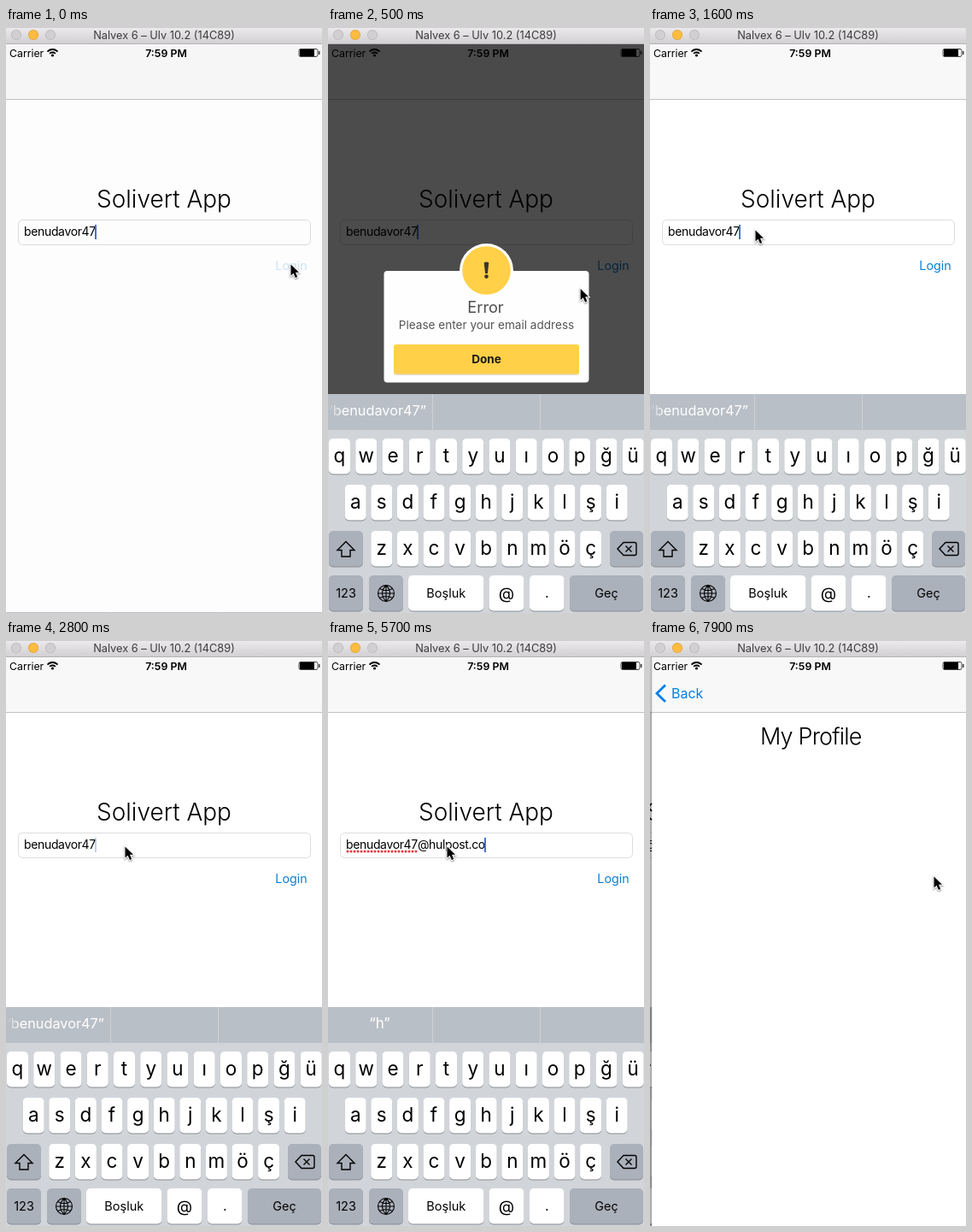
An HTML page with a canvas that plays this animation: 370 px wide and 684 px high, repeating every 8000 ms.

```html
<!DOCTYPE html>
<html lang="en">
<head>
<meta charset="utf-8">
<title>Login demo</title>
<style>
html, body { margin: 0; width: 100%; height: 100%; overflow: hidden; background: #fff; }
canvas { display: block; }
</style>
</head>
<body>
<canvas id="stage" width="370" height="684"></canvas>
<script>
const W = 370, H = 684, LOOP = 8000, STEP = 100;
const stage = document.getElementById('stage').getContext('2d');
const sheet = new OffscreenCanvas(W, H).getContext('2d');
let c = stage;
const USER = 'benudavor47', DOMAIN = 'hulpost.com';
const BLUE = '#0b7fcf', YELLOW = '#ffd048', BAR = '#b9bfc6';

// Interpolates rows of [time, value, value...], eased between rows.
function track(rows, t, i = 1) {
  let k = 0;
  while (k < rows.length - 1 && rows[k + 1][0] <= t) k++;
  const a = rows[k], b = rows[k + 1];
  if (!b || t <= a[0]) return a[i];
  const u = (t - a[0]) / (b[0] - a[0]);
  return a[i] + (b[i] - a[i]) * u * u * (3 - 2 * u);
}

const pointer = [
  [0, 333, 276], [300, 333, 276], [900, 187, 386], [1100, 180, 382], [1200, 158, 346],
  [1600, 123, 236], [2000, 123, 236], [2400, 139, 240], [6200, 139, 240], [6900, 332, 275]
];
const alertShift = [[0, -400], [200, -54], [300, 12], [500, 0]];
const alertAlpha = [[0, 0.01], [100, 0.43], [200, 0.85], [300, 1], [1200, 1], [1300, 0.6], [1500, 0]];
const keyTimes = [4400, 4500, 4600, 4800, 5000, 5100, 5300, 5500, 5600, 5700, 5900];

function text(s, x, y, size, color = '#000', align = 'center', weight = 400, spacing = 0) {
  c.font = `${weight} ${size}px Inter, Roboto, sans-serif`;
  c.letterSpacing = spacing + 'px';
  c.textAlign = align;
  c.fillStyle = color;
  c.fillText(s, x, y);
  return c.measureText(s).width;
}

function rect(x, y, w, h, color) {
  c.fillStyle = color;
  c.fillRect(x, y, w, h);
}

function box(x, y, w, h, r, color) {
  c.fillStyle = color;
  c.beginPath();
  c.roundRect(x, y, w, h, r);
  c.fill();
}

function disc(x, y, r, color) {
  c.fillStyle = color;
  c.beginPath();
  c.arc(x, y, r, 0, 7);
  c.fill();
}

function stroke(d, color, width) {
  c.strokeStyle = color;
  c.lineWidth = width;
  c.stroke(new Path2D(d));
}

function layer(alpha, draw) {
  c.save();
  c.globalAlpha *= alpha;
  draw();
  c.restore();
}

// Like layer, but fades everything drawn as one flat picture.
function group(alpha, draw) {
  c = sheet;
  c.clearRect(0, 0, W, H);
  c.save();
  draw();
  c.restore();
  c = stage;
  layer(alpha, () => c.drawImage(sheet.canvas, 0, 0));
}

function titleBar() {
  const g = c.createLinearGradient(0, 0, 0, 18);
  g.addColorStop(0, '#ebe9eb');
  g.addColorStop(1, '#d2d0d2');
  rect(0, 0, W, 18, g);
  rect(0, 18, W, 1, '#b4b2b4');
  ['#b9b7b9', '#dfa13a', '#b9b7b9'].forEach((edge, i) => {
    disc(12 + i * 20, 8, 6, edge);
    disc(12 + i * 20, 8, 5.2, i === 1 ? '#fdbc40' : '#d1cfd1');
  });
  text('Nalvex 6 – Ulv 10.2 (14C89)', 185, 13, 12.8, '#3c3c3c');
}

function navBar(back) {
  rect(0, 19, W, 64, '#f8f8f8');
  rect(0, 83, W, 1, '#c2c2c2');
  text('Carrier', 4, 34, 12.3, '#000', 'left');
  for (const r of [4.5, 8]) {
    c.beginPath();
    c.arc(54.5, 33, r, -Math.PI * 0.77, -Math.PI * 0.23);
    c.strokeStyle = '#000';
    c.lineWidth = 1.8;
    c.stroke();
  }
  disc(54.5, 32, 1.6, '#000');
  text('7:59 PM', 187.5, 34, 12.4, '#000', 'center', 600);
  stroke('M345 24.5h18a2 2 0 0 1 2 2v5a2 2 0 0 1-2 2h-18a2 2 0 0 1-2-2v-5a2 2 0 0 1 2-2z', '#444', 1);
  rect(344, 25, 17, 8, '#000');
  rect(366, 27, 1.5, 4, '#444');
  if (back) layer(back, () => {
    stroke('M18 51.5L8 61.3L18 71', '#007fe8', 2.8);
    text('Back', 25, 67, 16, '#007fe8', 'left');
  });
}

// Caret opacity, fading out and in once a second.
function blink(t) {
  const p = t % 1000;
  if (p < 300) return 1 - p / 300;
  if (p < 500) return 0;
  return Math.min(1, (p - 500) / 300);
}

function loginPage(t) {
  rect(0, 84, W, H - 84, '#fff');
  text('Solivert App', 185, 210, 28, '#000', 'center', 300);
  c.beginPath();
  c.roundRect(14.5, 224.5, 342, 29, 5);
  c.strokeStyle = '#dcdcdc';
  c.lineWidth = 1;
  c.stroke();

  const typed = keyTimes.filter(k => k <= t).length;
  const value = USER + (t >= 3200 ? '@' : '') + DOMAIN.slice(0, typed);
  const end = 21 + text(value, 21, 243, 14, '#000', 'left', 400, -0.35);
  if (t >= 3400) for (let x = 23; x < 104; x += 4) disc(x, 246, 1.5, '#e8383c');
  const on = t >= 6200 ? blink(t - 6200) : t >= 1600 && t < 3200 ? blink(t - 1600) : 1;
  layer(on, () => rect(Math.round(end) - 1, 230, 2, 17, '#4673cf'));

  const pressed = t < 100 || (t >= 7100 && t < 7400);
  layer(pressed ? 0.2 : t < 200 ? 0.6 : 1, () => text('Login', 334, 283, 14.3, BLUE));
}

function key(x, y, w, label, size, gray) {
  box(x, y + 1, w, 41.5, 5, '#888c91');
  box(x, y, w, 41.5, 5, gray ? '#abb1bb' : '#fff');
  if (label) text(label, x + w / 2, y + (size > 18 ? 28 : 26), size);
}

function keyRow(letters, x, y, pitch) {
  [...letters].forEach((s, i) => key(x + i * pitch, y, 25, s, 22.5));
}

function suggestions(t) {
  const fresh = track([[3300, 0], [4200, 1]], t);
  layer(1 - Math.min(1, fresh * 2), () => {
    text(`“${USER}”`, 115, 25, 16.3, '#fff', 'right');
    const g = c.createLinearGradient(0, 0, 16, 0);
    g.addColorStop(0, BAR);
    g.addColorStop(1, 'rgba(185,191,198,0)');
    rect(0, 4, 16, 32, g);
  });
  if (t >= 4400) text('“h”', 60.5, 25, 17, '#fff');
  else layer(fresh, () => ['bir', 'bu', 'de'].forEach((s, i) => text(s, 60 + i * 125.5, 25, 17, '#fff')));
}

function keyboard(t, y) {
  c.save();
  c.translate(0, y);
  rect(0, 0, W, 256, '#d1d5da');
  rect(0, 0, W, 42, BAR);
  rect(122, 0, 1, 42, '#cdd1d6');
  rect(248, 0, 1, 42, '#cdd1d6');
  suggestions(t);
  keyRow('qwertyuıopğü', 1, 52, 31.25);
  keyRow('asdfghjklşi', 19.7, 106, 30.6);
  keyRow('zxcvbnmöç', 50.3, 160, 30.6);
  key(1, 160, 40, '', 0, true);
  key(330, 160, 39, '', 0, true);
  key(1, 212, 40, '123', 14.5, true);
  key(48, 212, 40, '', 0, true);
  key(94, 212, 88.5, 'Boşluk', 14.5);
  key(188.5, 212, 41, '@', 19);
  key(236, 212, 40.5, '.', 16);
  key(283, 212, 86, 'Geç', 14.5, true);
  stroke('M21 172.5L31 182.5H26V190H16V182.5H11Z', '#000', 1.4);
  stroke('M339 181L346 173.5H359Q361 173.5 361 175.5V186.5Q361 188.5 359 188.5H346ZM348.5 177.5l7 7m0-7l-7 7', '#000', 1.4);
  stroke('M58.5 233a9.5 9.5 0 1 0 19 0a9.5 9.5 0 1 0-19 0H77.5M68 223.5V242.5M68 223.5q-9 9.5 0 19q9-9.5 0-19M60.5 227.5q7.5 4 15 0M60.5 238.5q7.5-4 15 0', '#000', 1.1);
  c.restore();
}

function alertBox(t) {
  const alpha = track(alertAlpha, t);
  if (alpha <= 0) return;
  group(alpha, () => {
    rect(0, 19, W, H, 'rgba(0,0,0,.7)');
    c.translate(0, 284 + track(alertShift, t));
    box(65.5, 0, 240, 130.5, 4, '#fefefe');
    disc(185.5, -0.5, 31.5, '#fefefe');
    disc(185.5, -0.5, 28.3, YELLOW);
    c.fillStyle = '#37352f';
    c.fill(new Path2D('M182.7 -9.5q2.8-1.8 5.6 0l-1.4 12.5h-2.8z'));
    disc(185.5, 6.6, 2.3, '#37352f');
    text('Error', 184.5, 49, 18.2, '#4d4d4d');
    text('Please enter your email address', 185.5, 68, 13.6, '#555');
    box(77, 87, 217, 35, 3, '#e4dcc3');
    box(77, 86, 217, 34.5, 3, YELLOW);
    text('Done', 185.5, 108, 13.6, '#1c1a14', 'center', 700);
  });
}

function profilePage(x) {
  const g = c.createLinearGradient(x - 7, 0, x, 0);
  g.addColorStop(0, 'rgba(0,0,0,0)');
  g.addColorStop(1, 'rgba(0,0,0,.3)');
  rect(x - 7, 19, 7, H, g);
  rect(x, 84, W, H, '#fff');
  text('My Profile', x + 186, 121, 27, '#000', 'center', 300, -0.8);
}

function cursor(t) {
  c.save();
  c.translate(track(pointer, t, 1), track(pointer, t, 2));
  const arrow = new Path2D('M.5 .5V13.5L3.6 10.7L5.9 16L8.2 15L6 9.8H10Z');
  c.strokeStyle = '#fff';
  c.lineWidth = 2;
  c.shadowColor = 'rgba(0,0,0,.45)';
  c.shadowBlur = 2;
  c.shadowOffsetY = 1;
  c.stroke(arrow);
  c.shadowColor = 'transparent';
  c.fillStyle = '#000';
  c.fill(arrow);
  c.restore();
}

function draw(t) {
  const push = Math.min(1, Math.max(0, (t - 7700) / 245));
  const x = W * (1 - push) ** 3;
  const keysY = Math.round(428 + 255 * Math.max(0, 1 - t / 500) ** 2.6);

  rect(0, 0, W, H, '#fff');
  c.save();
  c.translate(-0.3 * (W - x), 0);
  loginPage(t);
  if (push) keyboard(t, keysY);
  c.restore();
  navBar(push && 1 - x / W);
  if (push) {
    rect(0, 84, W, H, `rgba(0,0,0,${0.1 * (1 - x / W)})`);
    profilePage(x);
  }
  alertBox(t);
  if (!push) keyboard(t, keysY);
  titleBar();
  cursor(t);
}

function frame(now) {
  draw(Math.floor(now % LOOP / STEP) * STEP);
  requestAnimationFrame(frame);
}
requestAnimationFrame(frame);
</script>
</body>
</html>
```
